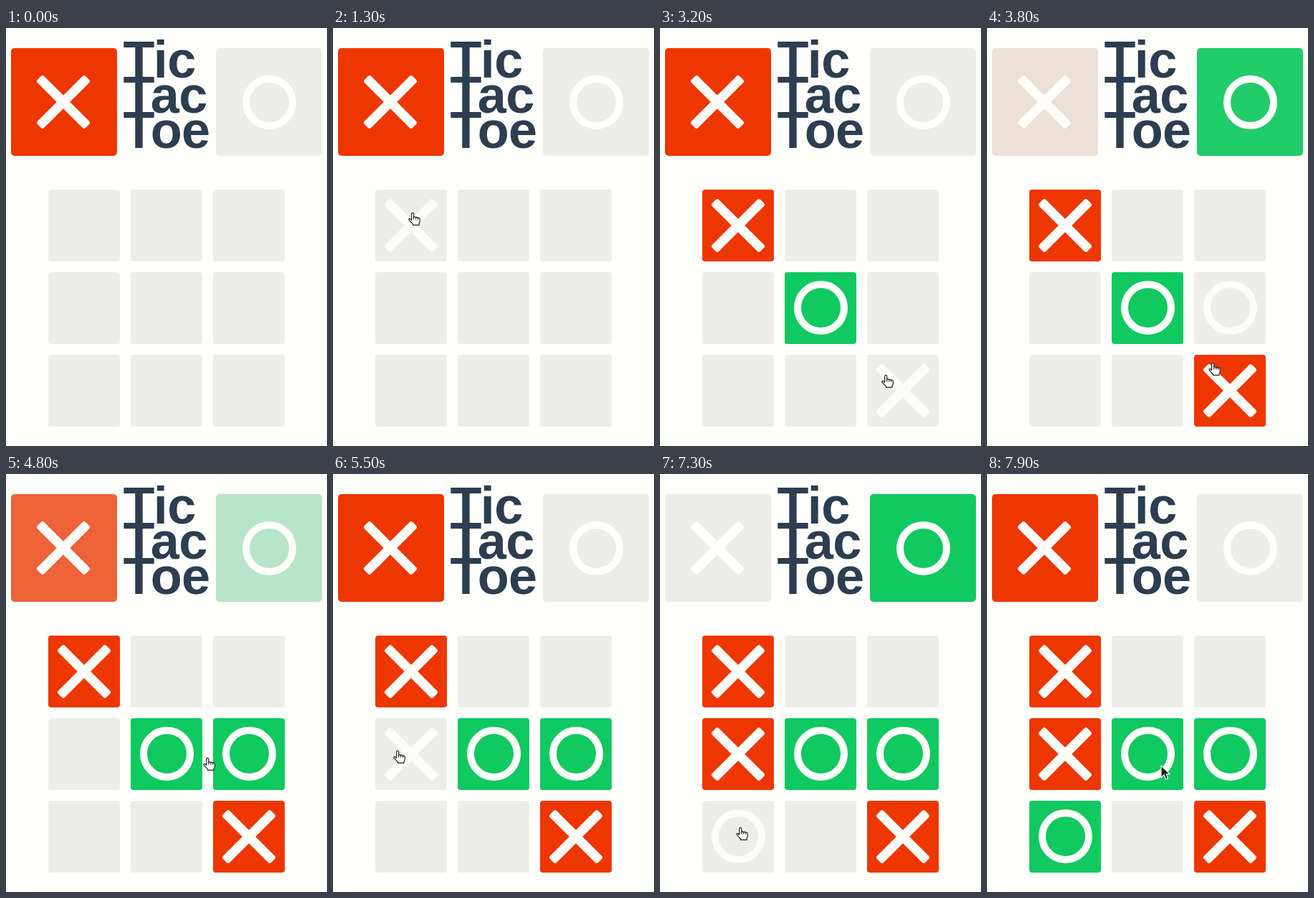
Recreate the animation shown at these times as an HTML page. Size 448 by 582 pixels, loop 8000 ms.

```html
<!DOCTYPE html>
<html lang="en">
<head>
<meta charset="utf-8">
<title>Tic Tac Toe</title>
<style>
  html, body { margin: 0; width: 100%; height: 100%; overflow: hidden; background: #fffffb; }
  svg { display: block; width: 448px; height: 582px; }
  text { font: bold 72px "Liberation Sans", Arial, sans-serif; letter-spacing: -.5px; fill: #2c3e50; }
  .mark { fill: none; stroke: none; }
  .x rect { fill: #fffffb; }
  .o circle { fill: none; stroke: #fffffb; stroke-width: 10; }
</style>
</head>
<body>
<svg viewBox="0 0 448 582">
  <defs>
    <g id="x" class="x">
      <rect x="-47.5" y="-6.5" width="95" height="13" rx="3" transform="rotate(45)"/>
      <rect x="-47.5" y="-6.5" width="95" height="13" rx="3" transform="rotate(-45)"/>
    </g>
    <g id="o" class="o"><circle cx=".5" r="32.5"/></g>
  </defs>
  <g id="head">
    <rect id="boxX" x="7" y="28" width="148" height="150" rx="5"/>
    <rect id="boxO" x="293" y="28" width="148" height="150" rx="5"/>
    <use href="#x" x="80" y="103"/>
    <use href="#o" x="367" y="103.5"/>
  </g>
  <text x="163.5" y="69">Tic</text>
  <text x="163.5" y="118">Tac</text>
  <text x="163.5" y="167">Toe</text>
  <g id="board"></g>
  <g id="cursor" stroke-linejoin="round">
    <path id="hand" fill="#fff" stroke="#222" stroke-width="1.2"
      d="M-1.3 10V1.9a1.5 1.5 0 0 1 3 0V6.2q1.6-1 3 .4q1.700-.7 2.800.7q2.700-.5 2.800 1.700V12q0 2-1.300 3.300V17.400H.6V16.200L-4.800 10.400q-.8-1.600.7-2q1.300.1 2.800 2.400M1.700 6.200V9.500M4.700 6.800V9.500M7.500 7.500V9.800"/>
    <path id="arrow" fill="#222" stroke="#fff" stroke-width="1.100"
      d="M0 0V16.500L4 12.900L6.700 19L9.600 17.700L7 11.900H12.200Z"/>
  </g>
</svg>
<script>
const $ = id => document.getElementById(id);
const LOOP = 8000, FRAME = 100, FADE = 500, LOOKAHEAD = 70;
const RED = [238, 54, 0], GREEN = [16, 201, 96], GREY = [237, 238, 234];
const NS = "http://www.w3.org/2000/svg";

// Moves in order: time, cell; X starts and the players alternate.
const moves = [[1570, 0], [2570, 4], [3470, 8], [4570, 5], [5670, 3], [7370, 6]];

// Pointer tip: time, x, y.
const path = [
  [400, 416, 2], [1200, 112, 258], [1300, 111, 257], [1600, 111, 257],
  [2000, 166, 331], [2400, 208, 378], [2600, 208, 378], [3200, 315, 483],
  [3600, 315, 483], [3800, 315, 466], [3900, 324, 413], [4100, 330, 398],
  [4600, 330, 398], [5300, 82, 384], [5500, 90, 385], [5800, 90, 385],
  [6200, 168, 470], [6400, 186, 481], [6700, 186, 481], [7000, 173, 484],
  [7100, 173, 484], [7300, 112, 492], [7400, 112, 492], [7900, 243, 406], [8000, 243, 406]
];

function add(parent, tag, attrs) {
  const el = document.createElementNS(NS, tag);
  for (const k in attrs) el.setAttribute(k, attrs[k]);
  return parent.appendChild(el);
}

const cells = Array.from({ length: 9 }, (_, i) => {
  const x = 59 + i % 3 * 115, y = 225 + Math.floor(i / 3) * 115;
  const board = $("board");
  return {
    x, y,
    box: add(board, "rect", { x, y, width: 100, height: 100, rx: 4 }),
    marks: [
      add(board, "use", { href: "#x", x: x + 50, y: y + 50 }),
      add(board, "use", { href: "#o", x: x + 50, y: y + 49.5 })
    ]
  };
});

const rgb = c => `rgb(${c.map(Math.round)})`;
const mix = (a, b, p) => rgb(a.map((v, i) => v + (b[i] - v) * p));

// cubic-bezier(.25, .1, .25, 1)
function ease(p) {
  if (p >= 1) return 1;
  const bez = (a, b, s) => 3 * a * s * (1 - s) ** 2 + 3 * b * s * s * (1 - s) + s ** 3;
  let lo = 0, hi = 1;
  for (let i = 0; i < 20; i++) {
    const s = (lo + hi) / 2;
    if (bez(.25, .25, s) < p) lo = s; else hi = s;
  }
  return bez(.1, 1, lo);
}

const slope = (i, k) => path[i] && path[i + 1]
  ? (path[i + 1][k] - path[i][k]) / (path[i + 1][0] - path[i][0]) : 0;

function tangent(i, k) {
  const a = slope(i - 1, k), b = slope(i, k);
  return a * b > 0 ? 2 * a * b / (a + b) : 0;
}

// Monotone cubic through the path points.
function pointer(t) {
  t = Math.min(Math.max(t, path[0][0]), LOOP - 1);
  const i = path.findIndex((p, n) => t >= p[0] && t < path[n + 1][0]);
  const d = path[i + 1][0] - path[i][0], s = (t - path[i][0]) / d;
  const h = s * s * (3 - 2 * s);
  return [1, 2].map(k => path[i][k] * (1 - h) + path[i + 1][k] * h
    + d * s * (1 - s) * ((1 - s) * tangent(i, k) - s * tangent(i + 1, k)));
}

const cellAt = ([x, y]) =>
  cells.findIndex(c => x >= c.x && x <= c.x + 100 && y >= c.y && y <= c.y + 100);

function draw(t) {
  const done = moves.filter(m => m[0] <= t);
  const turn = done.length % 2;
  const last = done[done.length - 1];
  const shown = t >= 400;
  const hover = shown ? cellAt(pointer(t + LOOKAHEAD)) : -1;

  cells.forEach((c, i) => {
    const n = done.findIndex(m => m[1] === i);
    const kind = n >= 0 ? n % 2 : i === hover ? turn : -1;
    c.box.setAttribute("fill", rgb(n < 0 ? GREY : n % 2 ? GREEN : RED));
    c.marks.forEach((m, k) => {
      m.style.display = k === kind ? "" : "none";
      m.style.opacity = n < 0 ? .85 : 1;
    });
  });

  const p = last ? ease((t - last[0]) / FADE) : 1;
  const live = turn ? 1 - p : p;
  $("boxX").setAttribute("fill", mix(GREY, RED, live));
  $("boxO").setAttribute("fill", mix(GREEN, GREY, live));

  const tip = pointer(t), over = cellAt(tip);
  const taken = done.some(m => m[1] === over) && over !== last[1];
  const arrow = tip[1] < 225 || taken;
  $("cursor").style.display = shown ? "" : "none";
  $("cursor").setAttribute("transform", `translate(${tip.map(Math.round)})`);
  $("arrow").style.display = arrow ? "" : "none";
  $("hand").style.display = arrow ? "none" : "";
}

const start = performance.now();
function tick() {
  const t = (performance.now() - start) % LOOP;
  draw(Math.floor(t / FRAME) * FRAME);
  requestAnimationFrame(tick);
}
tick();
</script>
</body>
</html>
```
